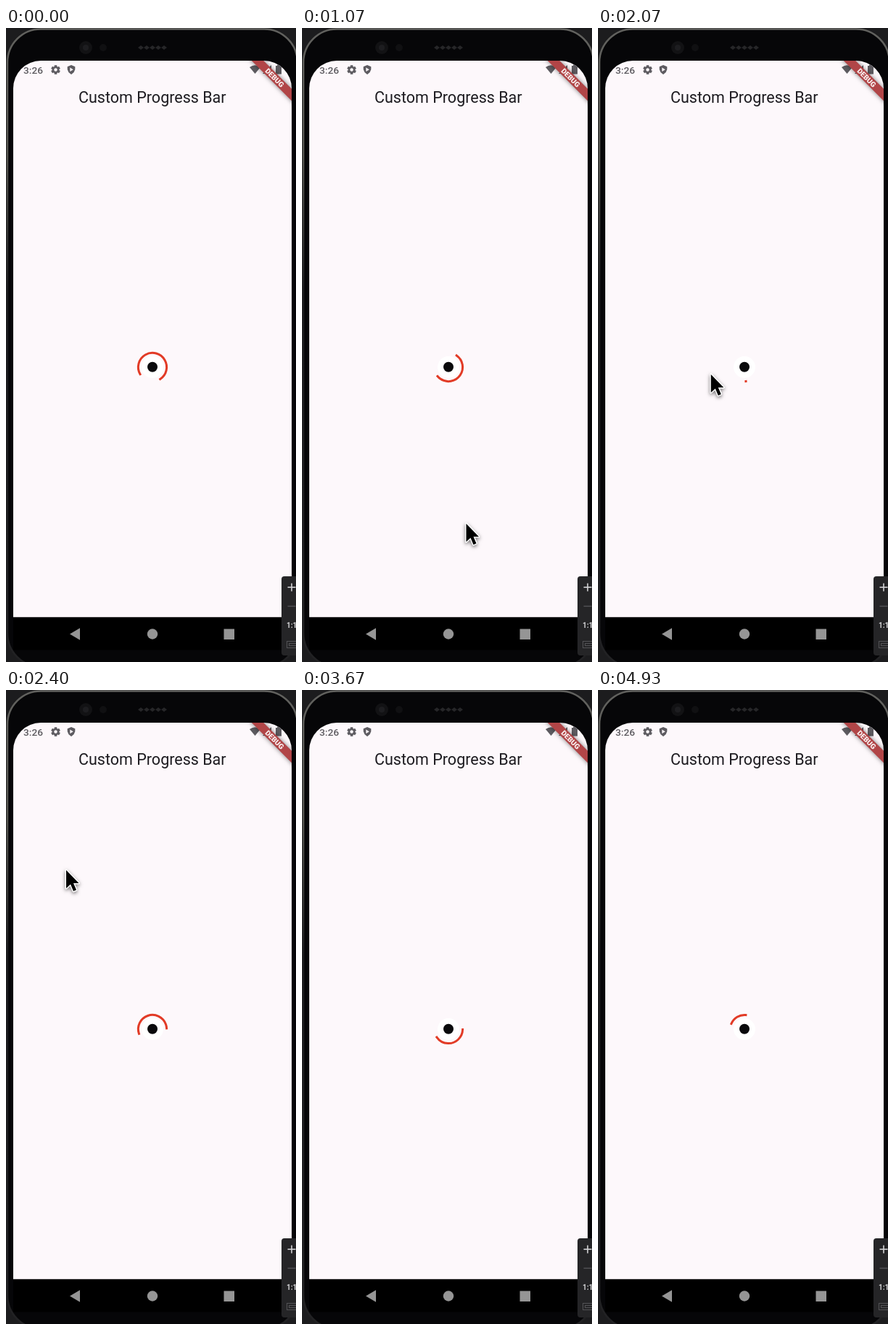
An HTML page with a canvas for the animation above (4990 ms loop, 400 px wide and 873 px high).

```html
<!DOCTYPE html>
<html lang="en">
<head>
<meta charset="utf-8">
<title>Custom Progress Bar</title>
<style>
  html, body { margin: 0; width: 100%; height: 100%; overflow: hidden; background: #000; }
  canvas { display: block; width: 400px; height: 873px; }
</style>
</head>
<body>
<canvas id="stage" width="400" height="873"></canvas>
<script>
const ctx = document.getElementById('stage').getContext('2d');
const LOOP = 4990, FPS = 15;
const SURFACE = '#fdf8fb', ICON = '#5d5b60', NAV = '#959595';
const LIGHT = '#d2d2d4', DIM = '#535356';
const TAU = Math.PI * 2;

function fillPath(points, color) {
  ctx.beginPath();
  points.forEach(([x, y]) => ctx.lineTo(x, y));
  ctx.closePath();
  ctx.fillStyle = color;
  ctx.fill();
}

function fillRect(x, y, w, h, color) {
  ctx.fillStyle = color;
  ctx.fillRect(x, y, w, h);
}

function disc(x, y, r, color) {
  ctx.beginPath();
  ctx.arc(x, y, r, 0, TAU);
  ctx.fillStyle = color;
  ctx.fill();
}

function roundRect(x, y, w, h, radii) {
  ctx.beginPath();
  ctx.roundRect(x, y, w, h, radii);
}

function label(text, x, y, font, color, align = 'left') {
  ctx.font = `${font} Roboto, sans-serif`;
  ctx.textAlign = align;
  ctx.fillStyle = color;
  ctx.fillText(text, x, y);
}

function drawPhone() {
  fillRect(0, 0, 400, 873, '#1c1c1e');
  const rim = ctx.createLinearGradient(0, 0, 0, 873);
  rim.addColorStop(0, '#62625f');
  rim.addColorStop(0.2, '#55554f');
  rim.addColorStop(0.42, '#1a1a1c');
  rim.addColorStop(1, '#222224');
  roundRect(2, 1.5, 400, 878, 46);
  ctx.fillStyle = '#060608';
  ctx.fill();
  ctx.strokeStyle = rim;
  ctx.lineWidth = 2.5;
  ctx.stroke();

  disc(110, 27, 9, '#121214');
  disc(110, 27, 4, '#1d1d20');
  disc(134, 27, 5, '#101012');
  for (let x = 182; x < 222; x += 8) {
    fillPath([[x, 27], [x + 4, 24], [x + 8, 27], [x + 4, 30]], '#262628');
  }
}

function drawGear(x, y) {
  ctx.save();
  ctx.translate(x, y);
  for (let i = 0; i < 6; i++) {
    ctx.rotate(TAU / 6);
    fillRect(-1.8, -6.3, 3.6, 4, ICON);
  }
  ctx.restore();
  disc(x, y, 4.8, ICON);
  disc(x, y, 2.2, SURFACE);
}

function drawStatusBar() {
  label('3:26', 24, 62.7, '500 13.7px', ICON);
  drawGear(68.5, 57.5);
  fillPath([[90, 51], [95.3, 53.2], [95.3, 57], [93.6, 61], [90, 64], [86.4, 61], [84.7, 57], [84.7, 53.2]], ICON);
  fillPath([[88.3, 54.6], [92.8, 57.3], [88.3, 60]], SURFACE);

  ctx.beginPath();
  ctx.moveTo(343.5, 63);
  ctx.lineTo(336, 54);
  ctx.quadraticCurveTo(343.5, 48.5, 351, 54);
  ctx.closePath();
  ctx.fillStyle = ICON;
  ctx.fill();
  fillPath([[354, 63], [366, 51], [366, 63]], ICON);
  fillRect(372, 52, 8, 11.5, ICON);
  fillRect(374, 50.5, 4, 2, ICON);
}

function drawBanner() {
  ctx.save();
  ctx.translate(370.5, 68.5);
  ctx.rotate(Math.PI / 4);
  ctx.shadowColor = 'rgba(0,0,0,0.5)';
  ctx.shadowBlur = 6;
  fillRect(-60, -5.8, 120, 11.6, '#b14547');
  ctx.shadowBlur = 0;
  label('DEBUG', 0, 3.5, '900 10px', '#fbf3f3', 'center');
  ctx.restore();
}

function drawScreen() {
  ctx.save();
  roundRect(10, 45, 384, 766.5, [38, 38, 0, 0]);
  ctx.fillStyle = SURFACE;
  ctx.fill();
  ctx.clip();
  drawStatusBar();
  label('Custom Progress Bar', 201.8, 103.3, '21.5px', '#1d1b20', 'center');
  drawBanner();
  ctx.restore();
}

function drawNavBar() {
  fillRect(10, 811.5, 384, 45, '#000');
  fillPath([[88, 834.5], [102, 826.3], [102, 842.7]], NAV);
  disc(202, 834.5, 7.2, NAV);
  fillRect(300.5, 827.5, 14.5, 14.5, NAV);
}

function drawToolbar() {
  roundRect(380, 755, 30, 109, 4);
  ctx.fillStyle = '#252527';
  ctx.fill();
  fillRect(388.5, 769.3, 11, 1.6, LIGHT);
  fillRect(393.2, 764.6, 1.6, 11, LIGHT);
  fillRect(388.5, 795.5, 11, 1.4, DIM);
  label('1:1', 387, 826, 'bold 10px', LIGHT);
  ctx.strokeStyle = DIM;
  ctx.lineWidth = 1;
  ctx.strokeRect(387.5, 844.5, 13, 9);
  ctx.strokeRect(390.5, 847.5, 10, 3);
}

// Solves the cubic-bezier(0.4, 0, 0.2, 1) easing by bisection.
function ease(x) {
  if (x <= 0) return 0;
  if (x >= 1) return 1;
  let lo = 0, hi = 1;
  for (let i = 0; i < 24; i++) {
    const u = (lo + hi) / 2, v = 1 - u;
    if (1.2 * v * v * u + 0.6 * v * u * u + u ** 3 < x) lo = u;
    else hi = u;
  }
  return 3 * (1 - lo) * lo * lo + lo ** 3;
}

function drawSpinner(time) {
  const phase = (0.431 + time / 1333) % 1;
  const turn = 0.559 + time / 2222;
  const head = ease(phase * 2) * 0.75;
  const tail = ease(phase * 2 - 1) * 0.75;
  const start = (tail + turn + phase / 4 - 0.25) * TAU;

  disc(202, 467, 15, '#fff');
  disc(202, 466.8, 7, '#0a0a0c');
  ctx.beginPath();
  ctx.arc(202, 467, 19.6, start, start + Math.max((head - tail) * TAU, 0.001));
  ctx.strokeStyle = '#e23b26';
  ctx.lineWidth = 3;
  ctx.lineCap = 'square';
  ctx.stroke();
}

// Pointer path: time, x, y.
const POINTER = [
  [730, 420, 830], [1000, 236, 690], [1070, 226, 682], [1270, 226, 682],
  [1670, 221, 677], [1800, 214, 660], [2400, 83, 248], [2600, -30, 130]
];

function drawPointer(time) {
  const i = POINTER.findIndex(key => key[0] > time);
  if (i < 1) return;
  const [t0, x0, y0] = POINTER[i - 1], [t1, x1, y1] = POINTER[i];
  const k = (time - t0) / (t1 - t0);
  ctx.save();
  ctx.translate(x0 + (x1 - x0) * k, y0 + (y1 - y0) * k);
  ctx.lineJoin = 'round';
  ctx.lineWidth = 3;
  ctx.strokeStyle = '#fff';
  ctx.shadowColor = 'rgba(0,0,0,0.4)';
  ctx.shadowBlur = 5;
  ctx.shadowOffsetY = 2;
  const arrow = [[0, 0], [0, 25], [6, 19.5], [10, 29], [14, 27.3], [10, 18], [17.5, 18]];
  fillPath(arrow, '#000');
  ctx.stroke();
  ctx.shadowColor = 'transparent';
  fillPath(arrow, '#000');
  ctx.restore();
}

function sampleTime(now) {
  let step = Math.floor((now % LOOP + 5) * FPS / 1000);
  if (step > 5 && step < 11) step = 5;
  return Math.min(step, 74) * 1000 / FPS;
}

const origin = performance.now();

function render() {
  const time = sampleTime(Math.max(0, performance.now() - origin));
  drawPhone();
  drawScreen();
  drawNavBar();
  drawSpinner(time);
  drawToolbar();
  drawPointer(time);
  requestAnimationFrame(render);
}

render();
</script>
</body>
</html>
```
